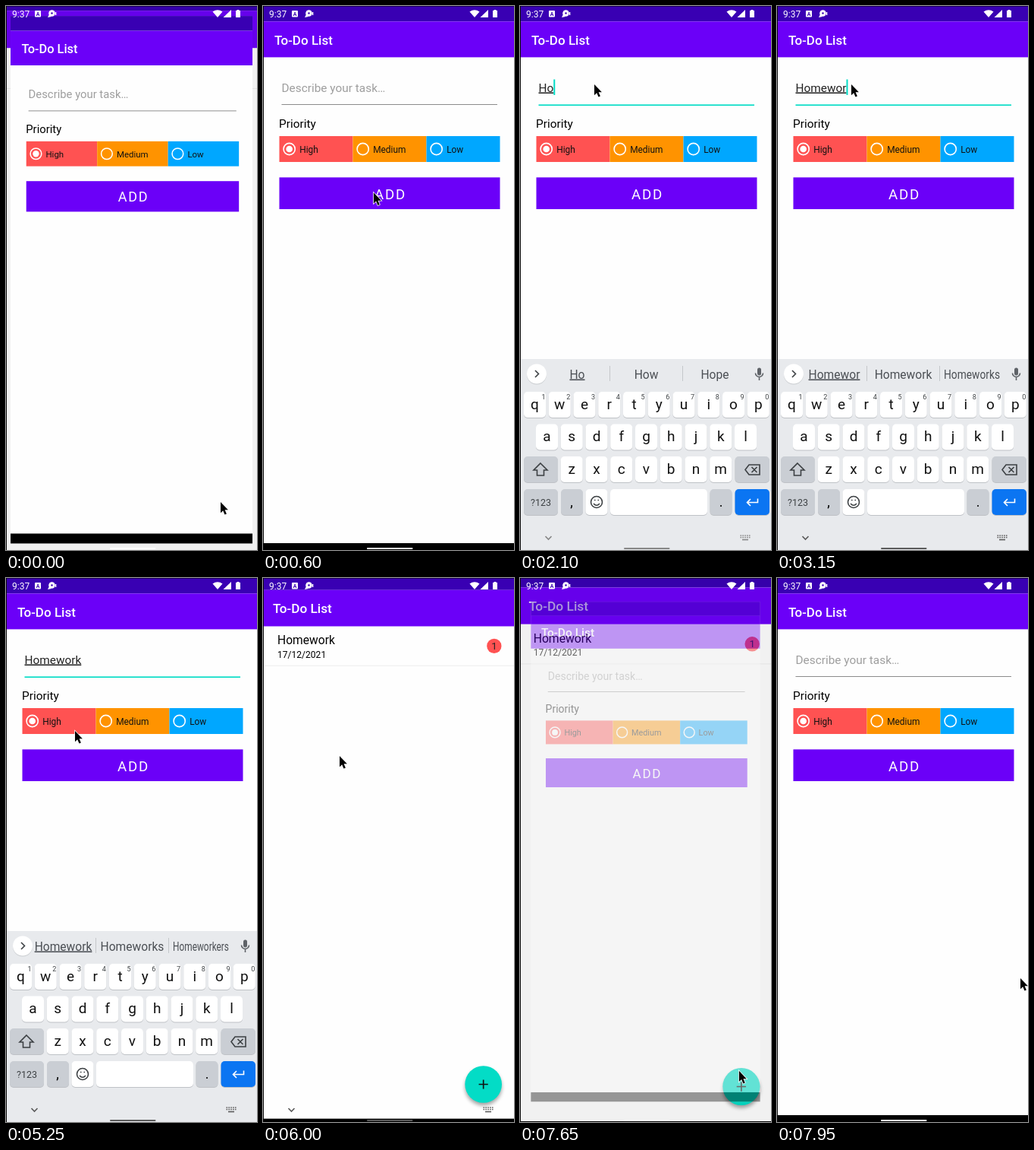
An HTML page for the animation above (8 s loop, 331 by 715 pixels).

```html
<!DOCTYPE html>
<html lang="en">
<head>
<meta charset="utf-8">
<title>To-do list</title>
<style>
  html, body { margin: 0; width: 100%; height: 100%; overflow: hidden; background: #000; }
  svg { display: block; width: 331px; height: 715px; font-family: Roboto, sans-serif; }
  .body { font-size: 15.4px; }
  .small { font-size: 11.9px; }
  .mid { text-anchor: middle; }
  .line { fill: none; stroke-width: 1.6; }
  .marked { text-decoration: underline 1px; }
</style>
</head>
<body>
<svg id="stage" viewBox="0 0 331 715"></svg>
<script>
const PURPLE = '#6b00f8', DARK = '#3900b3', TEAL = '#03dcc6', RED = '#ff5252';
const WORD = 'Homework';
const KEY_TIMES = [1500, 1800, 2240, 2500, 2700, 2900, 3040, 4640];
const HINTS = [['H', 'He', 'Hi'], ['Ho', 'How', 'Hope'], ['Hom', 'Home', 'Homes'],
  ['Home', 'Homes', 'Homework'], ['Homew', 'Homework', 'Homeworks'], ['Homewo', 'Homework', 'Homeworks'],
  ['Homewor', 'Homework', 'Homeworks'], ['Homework', 'Homeworks', 'Homeworkers']];
// pointer tip: time, x, y
const PATH = [[0, 283, 652], [900, 98, 103], [4700, 98, 103], [5250, 91, 201], [5550, 100, 243],
  [5850, 100, 243], [6000, 101, 234], [6450, 238, 199], [6600, 262, 398], [7350, 287, 655],
  [7600, 287, 655], [7950, 321, 526], [8000, 321, 526]];
const FOCUS = 950, CLOSE = 5800, REOPEN = 7600, LOOP = 8000, STEP = 150;
const PAGE_H = 719.5; // pages reach a little below the stage

const rect = (x, y, w, h, fill, r = 0) =>
  `<rect x="${x}" y="${y}" width="${w}" height="${h}" rx="${r}" fill="${fill}"/>`;
const text = (x, y, s, attrs = '') => `<text x="${x}" y="${y}" ${attrs}>${s}</text>`;
const path = (d, attrs = '') => `<path d="${d}" ${attrs}/>`;

const page = content => rect(0, 0, 331, PAGE_H, '#fefefe') + rect(0, 0, 331, 20.3, DARK) +
  rect(0, 20.3, 331, 47.1, PURPLE) + rect(0, 706, 331, PAGE_H - 706, '#000') +
  text(15, 50.6, 'To-Do List', 'font-size="17" font-weight="500" fill="#fff"') + content;

const option = (label, i, color) => {
  const x = 21.5 + i * 97;
  return rect(x, 171, 97, 34, color) +
    `<circle cx="${x + 13.2}" cy="188" r="7.6" class="line" stroke="#fff"/>` +
    (i ? '' : `<circle cx="${x + 13.2}" cy="188" r="4.3" fill="#fff"/>`) +
    text(x + 26.7, 192.5, label, 'class="small" fill="#111"');
};

const listPage = page(
  text(21, 91, WORD, 'class="body"') + text(21, 108, '17/12/2021', 'class="small"') +
  `<circle cx="303" cy="93" r="9.5" fill="${RED}"/>` +
  text(303, 97.5, 1, 'class="mid" font-size="13" fill="#222"') + rect(0, 118, 331, 1, '#eee') +
  `<circle cx="289" cy="665" r="24" fill="#000" opacity=".35" filter="url(#blur)"/>
   <circle cx="289" cy="661.5" r="24" fill="${TEAL}"/>` +
  path('M283 661.5h12m-6-6v12', 'class="line" stroke="#111"'));

const addPage = page(
  text(24.5, 112.5, 'Describe your task…', 'id="prompt" class="body" fill="#9e9e9e"') +
  text(24.5, 112.5, '', 'id="typed" class="body marked" fill="#222"') +
  `<rect id="caret" y="96.5" width="2" height="20.5" fill="${TEAL}"/>
   <rect id="under" x="24.5" width="284.5"/>` +
  text(21, 160, 'Priority', 'class="body"') +
  option('High', 0, RED) + option('Medium', 1, '#ff9300') + option('Low', 2, '#00a7ff') +
  rect(21.5, 225.3, 291, 41.7, PURPLE) +
  text(147, 253.5, 'ADD', 'font-size="18.7" letter-spacing="1.8" fill="#fff"'));

const GREY_KEY = '#caced4', INK = '#3c4043', TOOL = '#5f6368';
const key = (x, y, w, fill = '#fff') => rect(x, y + 1, w, 34, '#bfc2c6', 5) + rect(x, y, w, 34, fill, 5);
const letters = (row, x0, y) => [...row].map((c, i) => {
  const x = x0 + i * 32.75;
  return key(x - 14.5, y, 29) + text(x, y + 22.5, c, 'class="mid" font-size="19" fill="#111"') +
    (y < 510 ? text(x + 11.5, y + 9.5, (i + 1) % 10, `class="mid" font-size="9" fill="${INK}"`) : '');
}).join('');
const icon = (d, color = INK) => path(d, `class="line" stroke="${color}"`);

const toolbar =
  icon('M61 477.5h10a2 2 0 0 1 2 2v7l-4.5 4.5h-7.5a2 2 0 0 1-2-2v-9.5a2 2 0 0 1 2-2zM62.5 484q3.5 5 7 0M73 486.5h-4.5v4.5', TOOL) +
  text(113, 488, 'GIF', `class="mid" font-size="12" font-weight="700" fill="${TOOL}"`) +
  icon('M155.5 478h11.5v13h-11.5zM158 482.5h6.5m-6.5 3h6.5m-6.5 3h4', TOOL) +
  rect(158.5, 475.5, 5.5, 4, TOOL, 1) +
  `<g fill="none" stroke="${TOOL}"><circle cx="209" cy="484" r="4.3" stroke-width="4"/>
   <circle cx="209" cy="484" r="6.7" stroke-width="2.4" stroke-dasharray="3.5 3.516"/></g>` +
  rect(238, 475, 1, 18, '#c4c7ca') +
  [262.5, 268, 273.5].map(x => `<circle cx="${x}" cy="484" r="1.7" fill="${TOOL}"/>`).join('');

const hints = rect(118, 473, 1, 20, '#c4c7ca') + rect(214, 473, 1, 20, '#c4c7ca') +
  [75.5, 166.5, 257].map((x, i) => `<g transform="translate(${x} 489.5)">` +
    text(0, 0, '', `class="hint mid ${i ? '' : 'marked'}" font-size="15.6" fill="#4b4f54"`) +
    '</g>').join('');

const keyboard = rect(0, 464, 331, 252, '#e8eaed') +
  '<circle cx="22" cy="484.5" r="13" fill="#c9cccf"/><circle cx="22" cy="483.5" r="13" fill="#fff"/>' +
  `<path id="chevron" class="line" stroke="${INK}"/>` +
  `<g id="toolbar">${toolbar}</g><g id="hints">${hints}</g>` +
  rect(313, 475.5, 5, 10, TOOL, 2.5) + icon('M310.5 482.5a5 5 0 0 0 10 0M315.5 488v4', TOOL) +
  letters('qwertyuiop', 19.5, 507) + letters('asdfghjkl', 35.5, 549.5) + letters('zxcvbnm', 68.2, 592) +
  key(5, 592, 45, GREY_KEY) + icon('M27 601l9 9h-4.5v7h-9v-7h-4.5z') +
  key(283.5, 592, 45.5, GREY_KEY) + icon('M297 609.5l5-6.5h14v13h-14zM305.5 606l7 7m0-7l-7 7') +
  key(5, 635, 45, GREY_KEY) + text(27.5, 657, '?123', `class="mid" font-size="12.5" fill="${INK}"`) +
  key(54, 635, 29, GREY_KEY) + text(68, 658, ',', 'class="mid" font-size="18"') +
  key(86.5, 635, 29) + `<circle cx="101" cy="652" r="7.5" class="line" stroke="${INK}"/>` +
  icon('M97 654q4 4.5 8 0M98 649.5h1.5m3 0h1.5') +
  key(119, 635, 128) +
  key(250.5, 635, 29, GREY_KEY) + text(265, 658, '.', 'class="mid" font-size="18"') +
  key(283.5, 635, 45.5, '#0b75f2') + icon('M313.5 647.5v5h-14m4.5-4.5l-4.5 4.5l4.5 4.5', '#fff');

const status = text(8, 14.5, '9:37', 'font-size="12"') + rect(38, 6, 8, 8.5, '#fff', 1) +
  text(42, 13, 'A', `class="mid" font-size="7" font-weight="700" fill="${DARK}"`) +
  `<circle cx="60.5" cy="9.5" r="4.3"/><circle cx="60.5" cy="9.5" r="1.2" fill="${DARK}"/>` +
  path('M57 11l-2 4 5-1zM65 8h1.3v4H65z') +
  path('M272.5 7.5q6.5-4.5 13 0l-6.5 7.5zM297 5v10h-10.5zM303 6h1.5v-1h3v1h1.5v9h-6z');

const navIcons = path('M33.5 697l4 4 4-4', 'class="line" stroke="currentColor"') +
  path('M290.5 696h13m-13 2.5h13', 'class="line" stroke="currentColor" stroke-dasharray="1.6 1.25"') +
  path('M293 701.5h8', 'class="line" stroke="currentColor"');

document.getElementById('stage').innerHTML =
  `<defs><filter id="blur" x="-30%" y="-30%" width="160%" height="160%"><feGaussianBlur stdDeviation="2.5"/></filter></defs>
  <g id="list">${listPage}</g><rect id="dim" width="331" height="715" opacity=".05"/>
  <g id="add">${addPage}</g><g id="keyboard">${keyboard}</g>
  <g id="nav">${navIcons}</g><rect id="pill" x="137" y="712" width="60.5" height="2" rx="1"/>
  <g fill="#fff">${status}</g>${rect(0, 0, 1, 715, '#0c0c0c')}${rect(0, 0, 331, .5, '#000')}
  <path id="pointer" d="M0 0v14.2l3.2-3 2.3 5.4 2.4-1-2.3-5.3h4.3z" stroke="#fff" stroke-width="1.5" paint-order="stroke"/>`;

const el = Object.fromEntries([...document.querySelectorAll('[id]')].map(e => [e.id, e]));
const hintTexts = document.querySelectorAll('.hint');
const set = (e, attrs) => { for (const k in attrs) e.setAttribute(k, attrs[k]); };
const show = (e, on) => { e.style.display = on ? '' : 'none'; };
const ramp = (t, start, span) => Math.min(1, Math.max(0, (t - start) / span));
const left = u => (1 - u) ** 3;
const zoom = (e, s) => set(e, { transform: `translate(${165.5 * (1 - s)} ${PAGE_H / 2 * (1 - s)}) scale(${s})` });
const typedAt = t => KEY_TIMES.filter(k => k <= t).length;

function drawPages(t) {
  const closing = t >= CLOSE && t < REOPEN;
  if (closing) {
    const rest = left(ramp(t, CLOSE, 400));
    zoom(el.list, 1 + .107 * rest);
    zoom(el.add, .9 + .1 * rest);
    set(el.add, { opacity: 1 - ramp(t, CLOSE, 100) });
  } else {
    const start = t < CLOSE ? -113 : REOPEN;
    const rest = left(ramp(t, start, 300));
    zoom(el.list, 1 + .055 * (1 - rest));
    zoom(el.add, 1 - .15 * rest);
    set(el.add, { opacity: ramp(t, start + 20, 80) });
  }
  show(el.dim, !closing);
}

function drawField(t) {
  const focused = t >= FOCUS && t < REOPEN;
  const n = focused ? typedAt(t) : 0;
  const since = t - (n ? KEY_TIMES[n - 1] : FOCUS);
  el.typed.textContent = WORD.slice(0, n);
  show(el.prompt, !n);
  show(el.caret, focused && since % 1100 < 550);
  set(el.caret, { x: 24.5 + (n ? el.typed.getComputedTextLength() : 0) });
  set(el.under, focused ? { y: 129.4, height: 1.7, fill: TEAL } : { y: 129, height: 1, fill: '#8c8c8c' });
}

function drawKeyboard(t) {
  const drop = t < CLOSE ? left(ramp(t, FOCUS, 300)) : ramp(t, CLOSE - 40, 150);
  set(el.keyboard, { transform: `translate(0 ${251 * drop})` });
  const n = typedAt(t - 80);
  show(el.toolbar, !n);
  show(el.hints, n);
  set(el.chevron, { d: n ? 'M20 479l4.5 4.5l-4.5 4.5' : 'M24 479l-4.5 4.5l4.5 4.5' });
  if (n) hintTexts.forEach((e, i) => {
    e.textContent = HINTS[n - 1][i];
    // words wider than their column are condensed
    const wide = e.getComputedTextLength();
    set(e, { transform: `scale(${wide > 84.5 || i > 1 ? Math.min(1, 74 / wide) : 1} 1)` });
  });
  const shade = 255 - 165 * (ramp(t, 1150, 1300) - ramp(t, 6000, 800));
  const grey = `rgb(${shade},${shade},${shade})`;
  set(el.pill, { fill: grey });
  set(el.nav, { color: grey });
  show(el.nav, t > 1100 && t < 6150);
}

function drawPointer(t) {
  const i = PATH.findIndex(p => p[0] > t);
  const [t0, x0, y0] = PATH[i - 1], [t1, x1, y1] = PATH[i];
  const u = (t - t0) / (t1 - t0), s = u * u * (3 - 2 * u);
  set(el.pointer, { transform: `translate(${x0 + (x1 - x0) * s} ${y0 + (y1 - y0) * s})` });
}

function tick() {
  const t = Math.floor(performance.now() % LOOP / STEP) * STEP;
  drawPages(t);
  drawField(t);
  drawKeyboard(t);
  drawPointer(t);
  requestAnimationFrame(tick);
}
tick();
</script>
</body>
</html>
```
